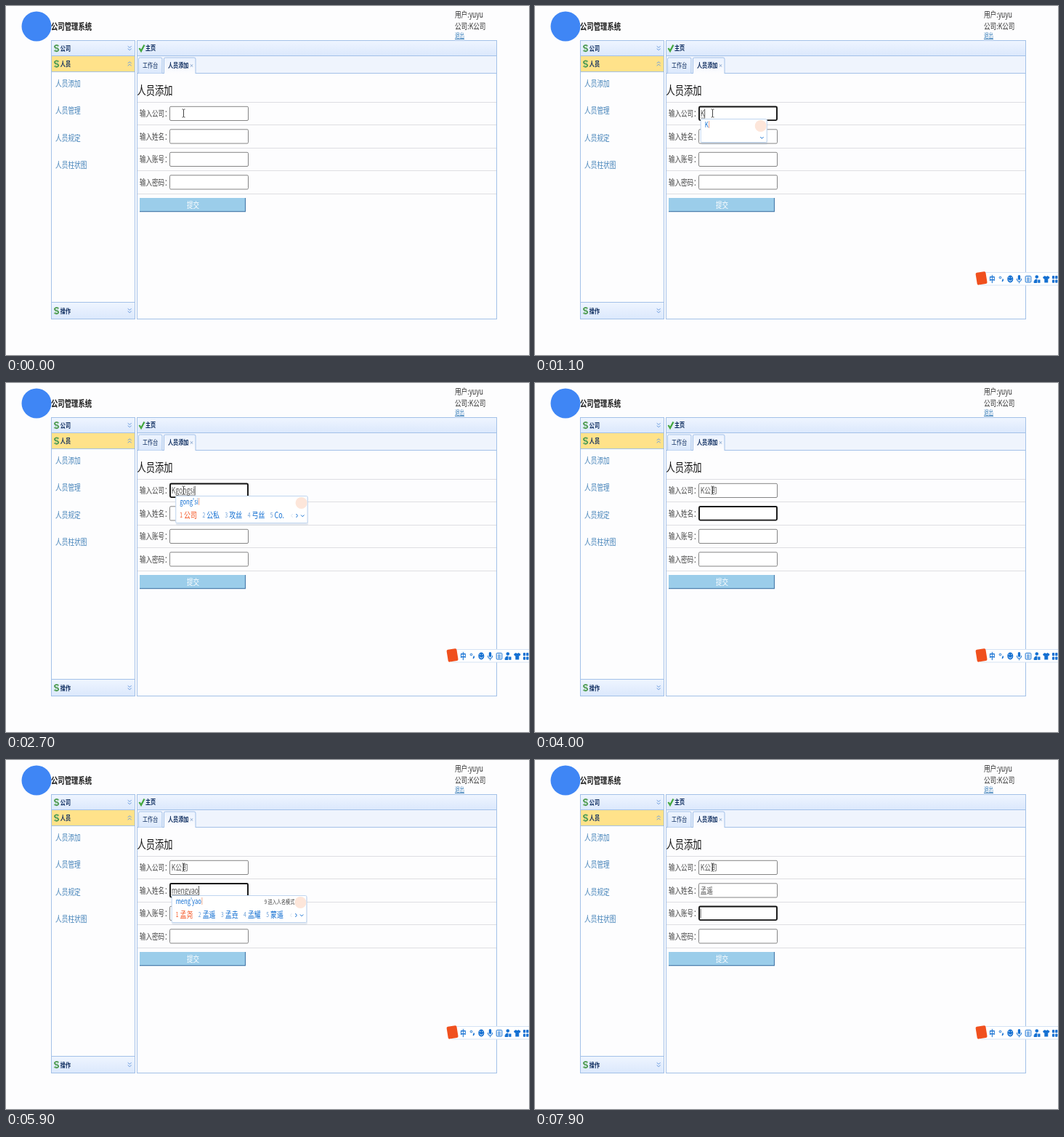
An HTML page that plays this animation: 720 by 480 pixels, repeating every 8 s.

```html
<!DOCTYPE html>
<html lang="zh-CN">
<head>
<meta charset="utf-8">
<style>
html, body { margin: 0; width: 720px; height: 480px; overflow: hidden; background: #fdfdfe }
svg { display: block }
text { font-family: "Noto Sans CJK SC", "Noto Sans CJK", "Noto Sans", sans-serif; white-space: pre }
</style>
</head>
<body>
<svg id="stage" width="720" height="480" viewBox="0 0 720 480">
  <defs>
    <linearGradient id="head" x2="0" y2="1"><stop stop-color="#eff5ff"/><stop offset="1" stop-color="#dbe8fc"/></linearGradient>
    <linearGradient id="open" x2="0" y2="1"><stop stop-color="#eaf2ff"/><stop offset="1" stop-color="#fdfdfe"/></linearGradient>
  </defs>
  <g id="page"></g>
  <g id="live"></g>
</svg>
<script>
const LOOP = 8000, SQUEEZE = 0.75;
const FONT = '"Noto Sans CJK SC", "Noto Sans CJK", "Noto Sans", sans-serif';
const BLUE = '#1470d2', LINE = '#a3c1e8', NAVY = '#0e2d5f';
const pen = document.createElement('canvas').getContext('2d');

const text = (x, y, size, str, fill, more = '') =>
  `<text transform="translate(${x} ${y}) scale(${SQUEEZE} 1)" font-size="${size}" fill="${fill}" ${more}>${str}</text>`;
const bold = (x, y, size, str, fill) => text(x, y, size, str, fill, 'font-weight="700"');
const rect = (x, y, w, h, fill, stroke = 'none', more = '') =>
  `<rect x="${x}" y="${y}" width="${w}" height="${h}" fill="${fill}" stroke="${stroke}" ${more}/>`;
const path = (d, stroke, width = 1, fill = 'none', more = '') =>
  `<path d="${d}" stroke="${stroke}" stroke-width="${width}" fill="${fill}" ${more}/>`;
const circle = (x, y, r, fill) => `<circle cx="${x}" cy="${y}" r="${r}" fill="${fill}"/>`;
const widthOf = (str, size) => {
  pen.font = `${size}px ${FONT}`;
  return pen.measureText(str).width * SQUEEZE;
};

const rowY = i => 138.5 + i * 31.5;

function accordion(y, h, label, fill, up) {
  const d = up ? -1 : 1, c = y + h / 2;
  const chevron = k => `M167.7 ${c + k - d}l2.5 ${2 * d} 2.5 ${-2 * d}`;
  return rect(62.5, y, 115, h, fill, LINE) +
    path(`M72.5 ${c - 3}q-4 -2.5 -5.5 .5q0 2 2.5 2.5q3.5 1 2.5 3q-2 2.5 -5.5 0`, '#4d9a50', 1.9) +
    path(`M67 ${c + 4.5}l5.5 -8.5`, '#8cc58c', .9) +
    path(chevron(-1.7 * d) + chevron(1.7 * d), '#6f9fe0') +
    bold(74.8, c + 3.5, 9.5, label, NAVY);
}

function drawPage() {
  let s = circle(42, 28, 20.5, '#3f86f5') +
    bold(62, 33, 12.5, '公司管理系统', '#1a1a1a') +
    text(618, 16, 11.5, '用户:yuyu', '#333') +
    text(618, 31.5, 11.5, '公司:K公司', '#333') +
    text(618, 44, 8.7, '退出', '#337ab7', 'text-decoration="underline"');

  s += rect(62.5, 47.5, 115, 383, '#fdfdfe', LINE) +
    accordion(47.5, 21, '公司', 'url(#head)') +
    accordion(68.5, 22, '人员', '#ffe28a', true) +
    accordion(407.5, 23, '操作', 'url(#head)');
  ['人员添加', '人员管理', '人员规定', '人员柱状图'].forEach((label, i) =>
    s += text(68, 110.5 + i * 37.6, 11.6, label, '#4583b9'));

  s += rect(180.5, 47.5, 495, 383, '#fdfdfe', LINE) +
    rect(180.5, 47.5, 495, 21, 'url(#head)', LINE) +
    path('M183.5 58l2.5 4 4.5 -8.5', '#45a83f', 2.3) +
    bold(192, 61.3, 9.5, '主页', NAVY) +
    rect(181, 69, 494, 23, '#eff4fd') +
    path('M181 92.5H675', LINE) +
    path('M182.5 92.5V73q0 -2 2 -2H213q2 0 2 2V92.5', LINE, 1, 'url(#head)') +
    path('M217.5 93V73q0 -2 2 -2H259q2 0 2 2V93', LINE, 1, 'url(#open)') +
    text(188, 85.3, 9.5, '工作台', NAVY) +
    bold(223, 85.3, 9.5, '人员添加', NAVY) +
    path('M254 80.3l3 3.4m0 -3.4l-3 3.4', '#7c9cc8', .9) +
    text(180.5, 122.3, 16.4, '人员添加', '#111');

  for (let i = 0; i < 5; i++) s += path(`M181 ${Math.round(132 + i * 31.4) + .5}H675`, '#dedee2');
  ['公司', '姓名', '账号', '密码'].forEach((label, i) =>
    s += text(184, rowY(i) + 13.8, 11.4, `输入${label}：`, '#444'));

  return s + rect(184, 264, 146, 19, '#9bcdea') +
    path('M184 282.7H329.5V264', '#4c7fae', 1.2) +
    text(249, 278, 11.4, '提交', '#fff');
}

function toolbar() {
  let s = rect(612, 366.5, 115, 17.5, '#fff', '#d5e3f4', 'rx="3"') +
    rect(607.5, 366, 14, 17, '#f0501e', 'none', 'rx="2" transform="rotate(-9 614 374)"') +
    bold(625.2, 379.6, 11, '中', BLUE) +
    `<circle cx="640.5" cy="373.5" r="1.3" fill="none" stroke="${BLUE}"/>` +
    path('M644.2 375.5v1.5l-1 1.8', BLUE, 1.6);
  s += `<ellipse cx="654.3" cy="375.5" rx="4" ry="5" fill="${BLUE}"/>` +
    path('M652 376.5q2.3 3.5 4.6 0M652.7 372.8v1.4m3.2 0v-1.4', '#fff', 1);
  s += rect(664.8, 370, 3.4, 7, BLUE, 'none', 'rx="1.7"') +
    path('M663.3 375q0 4 3.2 4t3.2 -4M666.5 379v2.3', BLUE, 1);
  s += rect(675.2, 371.5, 7.6, 8.5, '#fff', BLUE, 'rx="1"') +
    path('M677 374h4m-4 2h4m-4 2h4', BLUE, 1);
  s += circle(690.8, 372.5, 2.3, BLUE) + path('M687 380.5q0 -4.5 4 -4.5v4.5z', BLUE, 1, BLUE) +
    rect(692.3, 376.5, 3.2, 4.3, BLUE);
  s += path('M702 371l-3 2 1.3 2.5 1 -.4v5.5h5v-5.5l1 .4 1.3 -2.5 -3 -2q-1.8 1.8 -3.6 0z', 'none', 0, BLUE);
  for (const x of [712, 716.2]) for (const y of [371, 376.4]) s += rect(x, y, 3.2, 4.3, BLUE, 'none', 'rx=".8"');
  return s;
}

function popup(x, y, comp, words, note) {
  const w = Math.max(92, words.reduce((sum, word) => sum + wordWidth(word) + 13.3, 31));
  const h = words.length ? 38 : 33, end = x + widthOf(comp, 10.2);
  let s = rect(x + .5, y + 1.5, w, h + 1, '#8ea6c4', 'none', 'opacity=".22" rx="2"') +
    rect(x + .5, y + .5, w - 1, h - 1, '#fff', '#bfd5ef', 'rx="1.5"') +
    circle(x + w - 9, y + 10, 8, '#fde6da') +
    text(x + 6, y + 11.6, 10.2, comp, BLUE) +
    path(`M${end + 7} ${y + 3}v10`, '#ee9a7a', .8);
  if (note) s += text(x + 128, y + 11.6, 8.2, note, '#444');
  let cx = x + 6;
  words.forEach((word, i) => {
    const color = i ? BLUE : '#f4511e';
    s += text(cx, y + 30, 9, i + 1, i ? '#6b9ed6' : color) + text(cx + 5.8, y + 30.7, 11.9, word, color);
    cx += wordWidth(word) + 13.3;
  });
  const cy = y + (words.length ? 27.5 : 26);
  if (words.length) s += path(`M${x + w - 21} ${cy - 2.5}l-1.8 2.5 1.8 2.5`, '#dce6f2') +
    path(`M${x + w - 16} ${cy - 2.5}l1.8 2.5 -1.8 2.5`, BLUE);
  return s + path(`M${x + w - 9.5} ${cy - 1}l2.2 2.3 2.2 -2.3`, BLUE);
}
const wordWidth = word => widthOf(word, 11.9);

// time, focused row, filled values, composition, candidates, note
const steps = [
  [0, -1, []],
  [300, 0, []],
  [900, 0, [], 'K', ''],
  [1500, 0, ['K']],
  [2000, 0, ['K'], 'g', '个 给 过 跟 该'],
  [2150, 0, ['K'], 'go', '够 狗 购 构 沟'],
  [2300, 0, ['K'], 'gon', '公 共 工 供 宫'],
  [2400, 0, ['K'], 'gong', '公 共 工 供 宫'],
  [2500, 0, ['K'], "gong's", '公司 公式 告诉 公示 工伤'],
  [2600, 0, ['K'], "gong'si", '公司 公私 攻丝 弓丝 Co.'],
  [3000, 0, ['K公司']],
  [3500, 1, ['K公司']],
  [4400, 1, ['K公司'], 'm', '吗 没 嘛 们 妈'],
  [4600, 1, ['K公司'], 'me', '么 没 每 美 妹'],
  [4700, 1, ['K公司'], 'men', '们 门 闷 扪 焖'],
  [4800, 1, ['K公司'], 'meng', '梦 孟 猛 萌 蒙'],
  [5000, 1, ['K公司'], "meng'y", '孟尧 梦圆 萌芽 蒙冤 孟谚'],
  [5400, 1, ['K公司'], "meng'ya", '萌芽 孟尧 蒙牙 猛压 梦鸦'],
  [5600, 1, ['K公司'], "meng'yao", '孟尧 孟遥 孟垚 孟耀 蒙遥', '9 进入人名模式'],
  [6200, 1, ['K公司', '孟遥']],
  [6900, 2, ['K公司', '孟遥']],
];

function drawLive(step, caretOn, barOn) {
  const [, focus, values, comp, words, note] = step;
  let s = '', over = '';
  for (let i = 0; i < 4; i++) {
    const y = rowY(i), done = values[i] || '';
    const typed = i === focus && comp ? comp.replace("'", '') : '';
    s += i === focus
      ? rect(226, y, 107, 18.6, '#fff', '#111', 'stroke-width="1.9" rx="1.5"')
      : rect(225.5, y - .2, 108, 19.2, '#fff', '#858585', 'rx="1.5"');
    s += text(227.7, y + 13.7, 11.5, done + typed, '#555');
    if (i !== focus) continue;
    const start = 227.7 + widthOf(done, 11.5), end = start + widthOf(typed, 11.5);
    if (typed) {
      s += path(`M${start} ${y + 15.5}H${end}`, '#777', .8);
      over = popup(start, Math.round(y + 16.3), comp, words ? words.split(' ') : [], note);
    }
    if (caretOn) s += path(`M${end + .4} ${y + 3}v13`, '#333', .8);
  }
  return s + over + (barOn ? toolbar() : '') +
    path('M242.5 142h1.3l.7 .7 .7 -.7h1.3M244.5 142.7v9.6M242.5 153h1.3l.7 -.7 .7 .7h1.3', '#333', .9);
}

const page = document.getElementById('page'), live = document.getElementById('live');
page.innerHTML = drawPage();
let shown = '';
function frame() {
  const t = performance.now() % LOOP;
  const step = steps.findLast(s => s[0] <= t);
  const caretOn = !!step[3] || (t - step[0]) % 1000 < 500;
  const barOn = t >= 400;
  const key = [step[0], caretOn, barOn].join();
  if (key !== shown) live.innerHTML = drawLive(step, caretOn, barOn);
  shown = key;
  requestAnimationFrame(frame);
}
frame();
</script>
</body>
</html>
```
